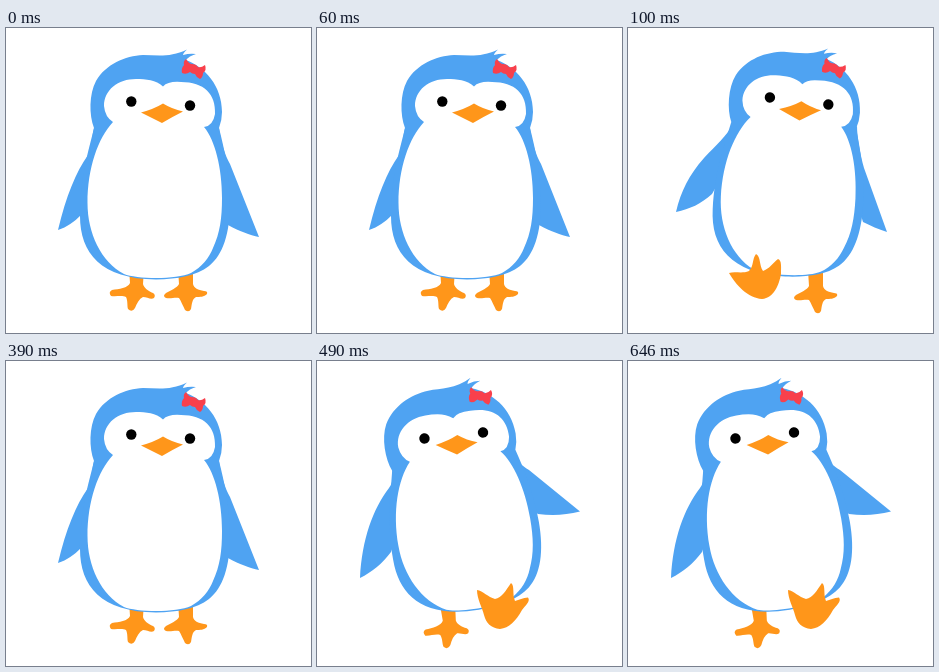
Recreate the animation shown at these times as an HTML page. Size 305x305 px, loop 750 ms.

```html
<!DOCTYPE html>
<html lang="en">
<head>
<meta charset="utf-8">
<title>Waddling penguin</title>
<style>
  html, body { margin: 0; width: 100%; height: 100%; overflow: hidden; background: #fff; }
  svg { display: block; width: 100%; height: 100%; }
  .blue { fill: #4fa3f2; }
  .orange { fill: #ff961a; }
  .red { fill: #f8404c; }
  .white { fill: #fff; }
</style>
</head>
<body>
<svg viewBox="0 0 305 305">
  <g class="orange">
    <path id="footL" d="M123 240L124 255C122 260 113 261 106 262Q102 264 105 268C110 269 116 267 120 269C122 273 121 278 122 281Q126 285 129 280C131 275 133 271 137 269C141 269 145 272 148 270Q150 267 147 265C142 263 138 260 137 256L138 240Z"/>
    <path id="footR" d="M172 240L173 256C171 260 165 262 160 265Q156 268 160 270C165 271 169 269 173 270C175 273 177 278 179 282Q183 285 185 281C186 276 186 271 190 269C194 269 198 269 201 266Q202 263 198 263C192 262 188 260 187 256L187 240Z"/>
  </g>
  <path id="wingL" class="blue"/>
  <path id="wingR" class="blue"/>
  <g id="body">
    <path class="blue" d="M88 100C83 87 83 66 90 53C100 36 119 28 137 27C150 27 164 30 181 21.5Q177 25 177 27Q184 25 190 26Q183 28 180 32C199 39 216 58 216 84Q216 92 213 100C218 120 224 145 224 175C224 205 217 227 203 238C190 248 172 251 150 251.5C95 251 74 225 74 188C74 150 82 125 88 100Z"/>
    <path class="white" d="M157 58.5C150 52 140 51 130 51C112 51 98 62 98 78Q99 89 107 94C92 110 81.500 140 81.500 175C81.500 205 95 234 118 246C130 251 170 252 185 245C196 239 203 230 207 220C214 205 216 190 216 170C216 140 209 112 198 99Q207 98 209 86C210 66 198 54 175 54Q162 53 157 58.5Z"/>
    <circle cx="125.3" cy="73.5" r="5.2"/>
    <circle cx="184" cy="77.5" r="5.2"/>
    <path id="beak" class="orange" d="M135 84.500Q148 81 157 75.500Q166 81 177 83.500Q166 89 156 95Q146 90 135 84.500Z"/>
    <path class="red" d="M180 31Q183 36 186 36Q190 36 192 39Q195 40 199 37Q201 42 197 45Q197 49 194 51Q190 49 189 46Q186 46 184 44Q180 47 176 45Q175 40 178 37Q177 33 180 31Z"/>
  </g>
  <path id="raised" class="orange"/>
</svg>
<script>
  const LOOP = 750;
  const HEAD = { x: 154.5, y: 75 };

  // at: where the head centre goes; lean: body angle; beak: its turn within the face;
  // left/right: foot transform, or null when lifted
  const stand = {
    at: [154.5, 75], lean: 0, beak: 0, left: "", right: "", raised: "",
    wingL: "M88 100C85 112 87 120 82 127C70 144 60 168 52 202C61 199 68 194 75 187L90 130Z",
    wingR: "M213 100C215 115 219 127 224 136L253 209C244 207 233 203 222 197L205 130Z"
  };
  const leanRight = {
    at: [171, 72.5], lean: 3, beak: 0, left: null, right: "translate(8 2)",
    wingL: "M104 97C99 108 88 117 76 130C61 147 53 163 48 184C62 181 73 176 84 166L110 120Z",
    wingR: "M229 97C229 110 232 125 236 140L259 204C250 201 243 198 235 194L215 130Z",
    raised: "M101 245C107 243 114 246 121 243C126 238 124 231 128 226C133 229 131 237 135 243C141 241 145 235 150 231C154 232 153 240 153 246C151 257 146 270 134 271C120 270 108 257 101 245Z"
  };
  const leanLeft = {
    at: [136.5, 74], lean: -9.7, beak: 7.5, left: "translate(2.5 4.5) rotate(-6 126 262)", right: null,
    wingL: "M75 104C76 115 77 120 72 127C56 148 45 178 43 217C55 211 65 203 74 191L95 130Z",
    wingR: "M196 92C199 100 204 104 212 109L263 150.5C249 154 236 155 221 153L190 130Z",
    raised: "M160 229C166 230 171 236 178 238C185 237 189 229 194 222C198 225 195 233 198 240C202 239 206 237 211 236.5C214 240 208 245 205 249C199 260 192 267 183 268C174 267 169 262 167 254C165 246 160 238 160 229Z"
  };
  const steps = [[100, stand], [390, leanRight], [490, stand], [LOOP, leanLeft]];

  const set = (id, name, value) => document.getElementById(id).setAttribute(name, value);

  function placeFoot(id, transform) {
    set(id, "visibility", transform === null ? "hidden" : "visible");
    set(id, "transform", transform || "");
  }

  function draw(pose) {
    set("body", "transform", `translate(${pose.at}) rotate(${pose.lean}) translate(${-HEAD.x} ${-HEAD.y})`);
    set("beak", "transform", `rotate(${pose.beak} 156 85)`);
    for (const id of ["wingL", "wingR", "raised"]) set(id, "d", pose[id]);
    placeFoot("footL", pose.left);
    placeFoot("footR", pose.right);
  }

  const start = performance.now();
  function tick(now) {
    const t = Math.max(0, now - start) % LOOP;
    draw(steps.find(([end]) => t < end)[1]);
    requestAnimationFrame(tick);
  }
  tick(start);
</script>
</body>
</html>
```
